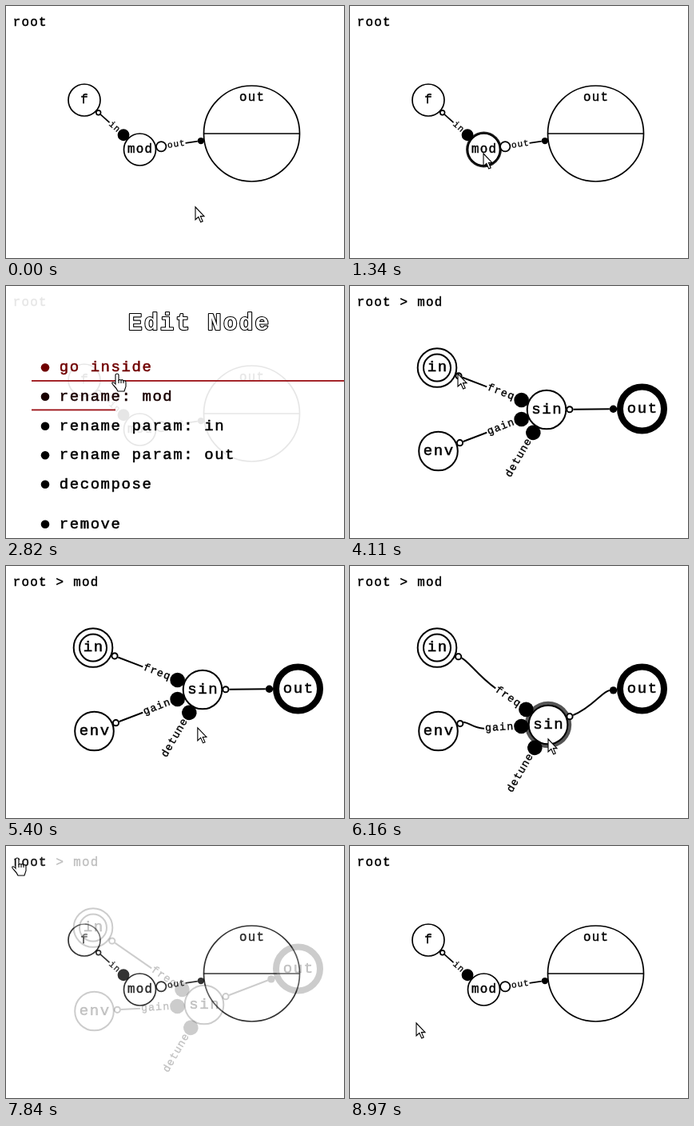
An HTML page with a canvas for the animation above (10 s loop, 423 by 316 pixels).

```html
<!DOCTYPE html>
<html lang="en">
<head>
<meta charset="utf-8">
<title>Node editor</title>
<style>
  html, body { margin: 0; width: 100%; height: 100%; overflow: hidden; background: #fff; }
  canvas { display: block; }
</style>
</head>
<body>
<canvas id="stage" width="423" height="316"></canvas>
<script>
const LOOP = 10000;
const ctx = document.getElementById('stage').getContext('2d');

const clamp = u => Math.min(1, Math.max(0, u));
const span = (t, a, b) => clamp((t - a) / (b - a));
const smooth = u => u * u * (3 - 2 * u);
const easeOut = u => 1 - (1 - u) ** 2;
const mix = (a, b, u) => a + (b - a) * u;

// Low, widely spaced letters; returns the extra space per letter.
function setFont(size, weight = '') {
  const scale = 0.88, gap = size * 0.6 * (1 - scale);
  ctx.font = `${weight} ${size * scale}px "Liberation Mono", "Courier New", monospace`;
  ctx.letterSpacing = `${gap}px`;
  return gap;
}

function text(str, x, y, size, align = 'left', color = '#000') {
  x += setFont(size) / 2;
  ctx.textAlign = align;
  ctx.fillStyle = ctx.strokeStyle = color;
  ctx.lineWidth = size * 0.025;
  ctx.fillText(str, x, y);
  ctx.strokeText(str, x, y);
}

const centered = (str, x, y, size) => text(str, x, y + size * 0.23, size, 'center');

function circle(x, y, r, fill, width = 0) {
  ctx.beginPath();
  ctx.arc(x, y, r, 0, 2 * Math.PI);
  ctx.fillStyle = fill;
  ctx.fill();
  if (!width) return;
  ctx.strokeStyle = '#000';
  ctx.lineWidth = width;
  ctx.stroke();
}

function halo(node, width, alpha) {
  if (alpha > 0 && width > 0) circle(node.x, node.y, node.r + width, `rgba(0,0,0,${alpha})`);
}

const dot = ([x, y], r, open, width) =>
  open ? circle(x, y, r - width / 2, '#fff', width) : circle(x, y, r, '#000');

const along = ([x, y], [dx, dy], d) => [x + dx * d, y + dy * d];

function toward(from, to) {
  const dx = to.x - from.x, dy = to.y - from.y, d = Math.hypot(dx, dy);
  return [dx / d, dy / d];
}

// Each end of a link sits on its node's rim, pointing at its own aim.
// bendA and bendB set how far the curve follows each end's direction.
function link(a, b, { label, size, outR, inR, width, labelAtOut = false,
                      aimA = b, aimB = a, bendA = 0.15, bendB = 0.45 }) {
  const ua = toward(a, aimA), ub = toward(b, aimB);
  const p = along([a.x, a.y], ua, a.r + outR);
  const q = along([b.x, b.y], ub, b.r + inR);
  let start = along(p, ua, outR), end = along(q, ub, inR);
  if (label) {
    setFont(size);
    const w = ctx.measureText(label).width + 1;
    const dir = labelAtOut ? ua : [-ub[0], -ub[1]];
    const mid = labelAtOut ? along(start, ua, w / 2) : along(end, ub, w / 2);
    if (labelAtOut) start = along(start, ua, w);
    else end = along(end, ub, w);
    ctx.save();
    ctx.translate(...mid);
    ctx.rotate(Math.atan2(dir[1], dir[0]));
    centered(label, 0, 0, size);
    ctx.restore();
  }
  const d = Math.hypot(end[0] - start[0], end[1] - start[1]);
  ctx.beginPath();
  ctx.moveTo(...start);
  ctx.bezierCurveTo(...along(start, ua, d * bendA), ...along(end, ub, d * bendB), ...end);
  ctx.strokeStyle = '#000';
  ctx.lineWidth = width;
  ctx.stroke();
  dot(p, outR, true, width);
  dot(q, inR, false);
}

function drawRoot(t) {
  const f = { x: 98, y: 118, r: 20 };
  const mod = { x: 167.5, y: 180, r: 20 };
  const out = { x: 307.5, y: 160, r: 60 };
  const width = 1.7, size = 18;
  const u = span(t, 1220, 2220);
  if (u > 0 && u < 1) halo(mod, 7 * Math.sqrt(u), 1 - u * 0.9);
  for (const n of [f, mod, out]) circle(n.x, n.y, n.r, '#fff', width);
  ctx.beginPath();
  ctx.moveTo(out.x - out.r, out.y);
  ctx.lineTo(out.x + out.r, out.y);
  ctx.stroke();
  centered('f', f.x, f.y, size);
  centered('mod', mod.x, mod.y, size);
  centered('out', out.x, 114.5, size);
  link(f, mod, { label: 'in', size: 12.6, outR: 3.7, inR: 7.4, width });
  link(mod, out, { label: 'out', size: 12.6, outR: 7, inR: 4.2, width, labelAtOut: true });
  text('root', 8, 25, size);
}

function drawMod(t) {
  const drag = smooth(span(t, 5650, 6080)), settle = span(t, 6080, 6780);
  const input = { x: 109, y: 102.5, r: 24.3 };
  const env = { x: 110.5, y: 207, r: 24.3 };
  const out = { x: 365.5, y: 154, r: 31.3 };
  const sin = { x: mix(246, 248, drag), y: mix(155, 199, drag), r: 24.3 };
  const lagging = { x: mix(246, 248, settle), y: mix(155, 199, settle) };
  const width = 2, size = 21.6, label = 15.1;
  const u = span(t, 5650, 7180);
  if (u > 0) halo(sin, 8.5 * Math.sqrt(u), 1 - u);
  for (const n of [input, env, sin]) circle(n.x, n.y, n.r, '#fff', width);
  circle(input.x, input.y, 17, '#fff', width);
  circle(out.x, out.y, 27.5, '#fff', 8);
  centered('in', input.x, input.y, size);
  centered('env', env.x, env.y, size);
  centered('sin', sin.x, sin.y, size);
  centered('out', out.x, out.y, size);
  const common = { size: label, outR: 4.6, inR: 9.3, width };
  link(input, sin, { ...common, label: 'freq', aimA: lagging });
  link(env, sin, { ...common, label: 'gain', aimA: lagging });
  link(sin, out, { ...common, inR: 4.7, aimB: lagging, bendA: 0.45, bendB: 0.15 });

  // Unconnected parameter
  ctx.save();
  ctx.translate(sin.x, sin.y);
  ctx.rotate(-Math.PI / 3);
  dot([-33.3, 0], 9.3, false);
  text('detune', -43, label * 0.23, label, 'right');
  ctx.restore();
  text('root > mod', 8, 25, 18);
}

const menuItems = [
  ['go inside', 107, 2655, 9999],
  ['rename: mod', 143.5, 2460, 2655],
  ['rename param: in', 180.5, 2260, 2460],
  ['rename param: out', 217],
  ['decompose', 253.5],
  ['remove', 303.5],
  ['copy', 340.5],
];

function drawMenu(t, open) {
  ctx.fillStyle = `rgba(255,255,255,${0.9 * open})`;
  ctx.fillRect(0, 0, 423, 316);
  ctx.save();
  ctx.translate(0, 200);
  ctx.scale(1, open);
  ctx.translate(0, -200);
  const titleX = 241 + setFont(33, 'bold') / 2;
  ctx.textAlign = 'center';
  ctx.lineJoin = 'round';
  ctx.lineWidth = 2.2;
  ctx.strokeStyle = '#000';
  ctx.strokeText('Edit Node', titleX, 54.5);
  ctx.fillStyle = '#fff';
  ctx.fillText('Edit Node', titleX, 54.5);
  for (const [str, y, enter = Infinity, leave = Infinity] of menuItems) {
    let hover = 0;
    if (t > enter) {
      hover = easeOut(clamp((Math.min(t, leave) - enter) / 300)) * (1 - easeOut(clamp((t - leave) / 300)));
    }
    const color = `rgb(${Math.round(140 * hover)},0,0)`;
    circle(49, y - 4.7, 5.3, color);
    text(str, 66, y, 21.6, 'left', color);
    ctx.fillStyle = '#9b0f14';
    ctx.fillRect(32, y + 11, 600 * hover, 1.8);
  }
  ctx.restore();
}

const arrow = new Path2D('M0 0V16L3.8 12.5L6.7 19L9.2 18L6.4 11.6H11Z');
const hand = new Path2D('M2 2Q2 0 4 0Q6 0 6 2V8Q7 7 9 8Q11 7 12 9Q15 8 15 11V16Q14 19 13 22H5Q4 19 0 15Q-3 12 -2 11Q0 10 2 13Z');
const knuckles = new Path2D('M6 8V12M9 8V12M12 9V12');

const moves = [
  [490, 970, 167, 185],
  [2260, 2770, 135, 110],
  [4110, 4830, 232, 241],
  [5120, 5640, 246, 173],
  [5650, 6080, 248, 217],
  [6160, 7160, 10, 15],
  [8370, 8970, 83, 222],
];

function drawCursor(t) {
  let x = 237, y = 252;
  for (const [a, b, tx, ty] of moves) {
    const u = smooth(span(t, a, b));
    x = mix(x, tx, u);
    y = mix(y, ty, u);
  }
  const pointing = (t > 2280 && t < 3460) || (t > 7040 && t < 8400);
  ctx.save();
  ctx.translate(x, y);
  ctx.lineWidth = 1.1;
  ctx.fillStyle = '#fff';
  ctx.strokeStyle = '#000';
  ctx.fill(pointing ? hand : arrow);
  ctx.stroke(pointing ? hand : arrow);
  if (pointing) ctx.stroke(knuckles);
  ctx.restore();
}

function draw(t) {
  ctx.fillStyle = '#fff';
  ctx.fillRect(0, 0, 423, 316);
  const back = span(t, 7200, 8000);
  if (t < 3420 || back > 0) {
    ctx.globalAlpha = back || 1;
    drawRoot(t);
  }
  if (t >= 3420 && back < 1) {
    ctx.globalAlpha = 1 - back;
    drawMod(t);
  }
  ctx.globalAlpha = 1;
  const open = span(t, 1880, 2170) * (1 - span(t, 3420, 3820));
  if (open > 0) drawMenu(t, open);
  drawCursor(t);
}

function frame() {
  draw(performance.now() % LOOP);
  requestAnimationFrame(frame);
}
frame();
</script>
</body>
</html>
```
